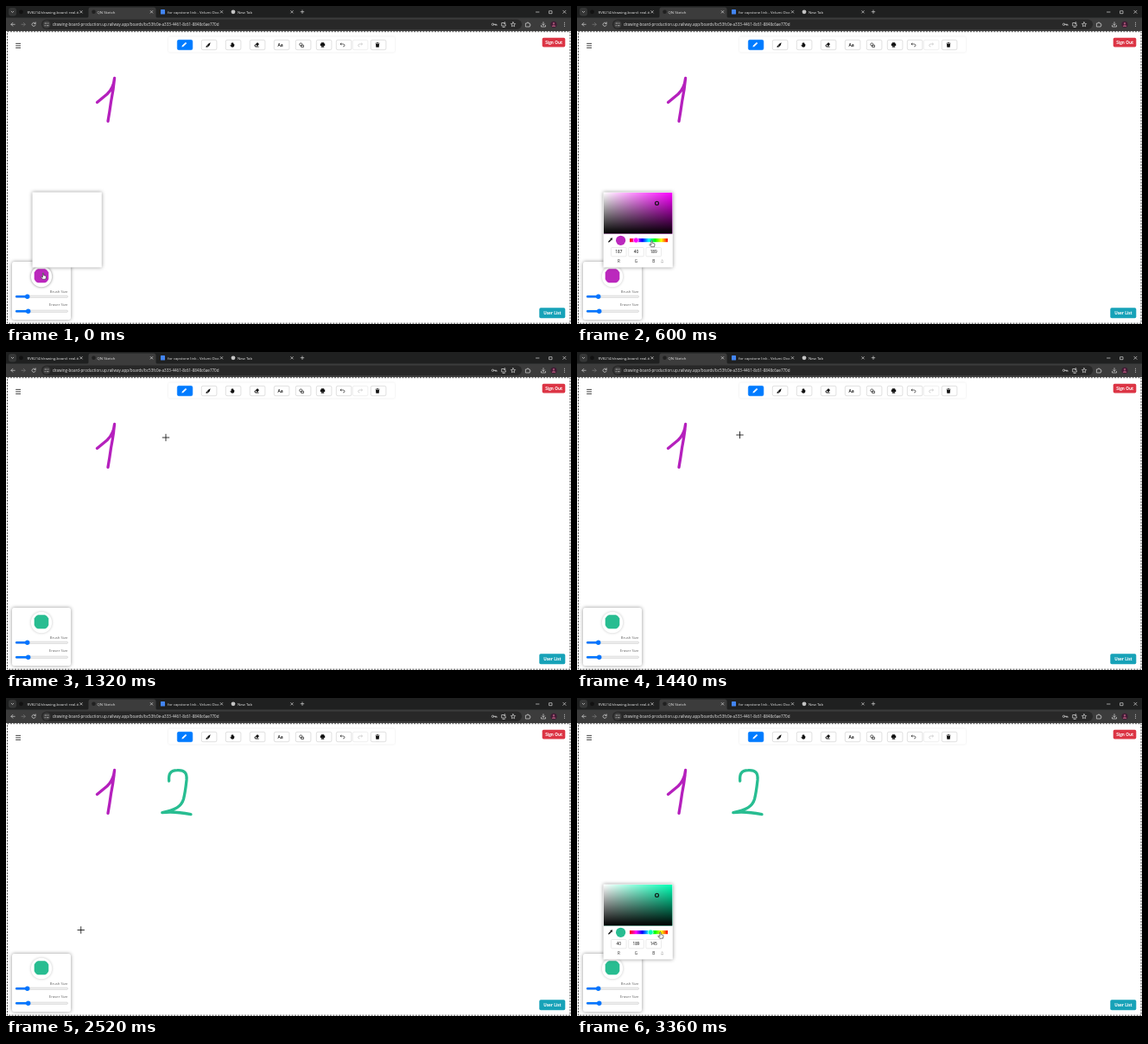
These frames come from a looping animation (654 by 368 pixels, 3480 ms). An HTML page:

```html
<!DOCTYPE html>
<html lang="en">
<head>
<meta charset="utf-8">
<title>Drawing board</title>
<style>
  html, body { margin: 0; width: 100%; height: 100%; overflow: hidden; background: #fff; }
  svg { display: block; width: 100vw; height: 100vh; }
  text { font-family: "Open Sans", "Noto Sans", sans-serif; font-size: 4.3px; }
  .light { fill: #e4e4e4; }
  .line { fill: none; stroke-linecap: round; stroke-linejoin: round; }
  .chrome { stroke: #d6d6d6; stroke-width: .7; }
  .mid { text-anchor: middle; }
  .button { font-size: 4.7px; font-weight: 700; fill: #fff; text-anchor: middle; }
  .label { font-size: 4.3px; fill: #666; text-anchor: end; }
  .shadow { filter: drop-shadow(0 .7px 2px rgba(0, 0, 0, .42)); }
</style>
</head>
<body>
<svg id="stage" viewBox="0 0 654 368" preserveAspectRatio="none">
  <defs>
    <linearGradient id="white"><stop stop-color="#fff"/><stop offset="1" stop-color="#fff" stop-opacity="0"/></linearGradient>
    <linearGradient id="black" x2="0" y2="1"><stop stop-color="#000" stop-opacity="0"/><stop offset="1"/></linearGradient>
    <linearGradient id="rainbow">
      <stop stop-color="#f00"/><stop offset=".167" stop-color="#f0f"/><stop offset=".333" stop-color="#00f"/>
      <stop offset=".5" stop-color="#0ff"/><stop offset=".667" stop-color="#0f0"/><stop offset=".833" stop-color="#ff0"/>
      <stop offset="1" stop-color="#f00"/>
    </linearGradient>
    <path id="close" class="line chrome" d="M-1.3-1.3 1.3 1.3M1.3-1.3-1.3 1.3"/>
  </defs>

  <!-- browser frame -->
  <rect width="654" height="14" fill="#1f2020"/>
  <rect y="13.5" width="654" height="15.5" fill="#3c3c3c"/>
  <path d="M93 14q2.5 0 2.5-2.5V4q0-2.5 2.5-2.5H171q2.5 0 2.5 2.5v7.5q0 2.5 2.5 2.5z" fill="#3c3c3c"/>
  <rect x="3" y="2" width="9" height="9.5" rx="3" fill="#353636"/>
  <path class="line chrome" d="M6.2 6.2 7.5 7.5 8.8 6.2M341.2 6.7h3.6M343 4.9v3.6M613.5 7h3.5M629 5.7h3v3h-3zM644.8 5.2l3.2 3.2m0-3.2-3.2 3.2"/>
  <circle cx="17.5" cy="6.8" r="2.4" fill="#111"/>
  <circle cx="101.5" cy="6.8" r="2.3" fill="#202020"/>
  <rect x="179" y="4" width="5" height="5.5" rx=".6" fill="#4285f4"/>
  <circle cx="263" cy="6.8" r="2.4" fill="#c4c4c4"/>
  <g class="light">
    <text x="24.5" y="8.5">RV8214/drawing-board: real-ti</text>
    <text x="105.5" y="8.5">QN Sketch</text>
    <text x="187" y="8.5">for capstone link - Velumi Doc</text>
    <text x="268" y="8.5">New Tab</text>
  </g>
  <use href="#close" x="87" y="6.8"/><use href="#close" x="168.5" y="6.8"/>
  <use href="#close" x="249.5" y="6.8"/><use href="#close" x="331" y="6.8"/>
  <rect x="41" y="15.5" width="556" height="11.5" rx="5.7" fill="#282828"/>
  <circle cx="47" cy="21.3" r="4.5" fill="#3c3c3c"/>
  <path class="line chrome" d="M45 20h2m1.5 0h.6M45 22.7h.5m1.7 0h2M10.2 21.3H6m1.8-1.9L6 21.3l1.8 1.9M34 20.2a2.1 2.1 0 1 0 .2 1.8M34.2 18.8v1.6h-1.6"/>
  <path class="line" stroke="#777" stroke-width=".75" d="M18 21.3h4.2m-1.8-1.9 1.8 1.9-1.8 1.9"/>
  <text class="light" x="54" y="23.1" style="font-size:4.56px">drawing-board-production.up.railway.app/boards/bc53fc0e-a333-4461-8c61-8848c6ae770d</text>
  <g class="line chrome">
    <circle cx="563.5" cy="21.3" r="1.2"/><path d="M565 21.3h3v1.2M566.7 21.3v1"/>
    <path d="M576.5 19.5H573.7v3.5h4.7v-1.3M575 24.5h2.2M577.3 18.5v2.5m-1-1 1 1 1-1"/>
    <path d="m587 18.7.8 1.7 1.8.2-1.3 1.3.3 1.8-1.6-.9-1.6.9.3-1.8-1.3-1.3 1.8-.2z"/>
    <path d="M601.8 20h1.4q0-1.3.8-1.3t.8 1.3h1.4v1.2q1 0 1 .8t-1 .8v1.2h-4.4z"/>
    <path d="M622 18.7v3.5m-1.5-1.4 1.5 1.5 1.5-1.5M619.5 22.5v1.5h5v-1.5"/>
  </g>
  <circle cx="634" cy="21.3" r="3.6" fill="#401c35"/>
  <path d="M631.8 24.1q0-2.2 2.2-2.2t2.2 2.2zM632.8 20.3a1.2 1.2 0 1 1 2.4 0 1.2 1.2 0 1 1-2.4 0" fill="#a04f70"/>
  <path class="line" stroke="#ddd" stroke-width="1" d="M646.5 19.3h.01M646.5 21.3h.01M646.5 23.3h.01"/>

  <!-- page -->
  <rect y="29" width="654" height="339" fill="#fff"/>
  <rect x="1.5" y="29.7" width="651.5" height="337.5" fill="none" stroke="#000" stroke-width=".7" stroke-dasharray="2.04 1.37"/>
  <path d="M11.2 43.4h5.8M11.2 45.9h5.8M11.2 48.4h5.8" stroke="#333" stroke-width=".9"/>
  <rect x="188" y="35.5" width="262" height="18" rx="2" fill="#fff" style="filter:drop-shadow(0 .5px 1px rgba(0,0,0,.1))"/>
  <g id="tools"></g>
  <rect x="620.7" y="36.7" width="26.6" height="10.8" rx="1.7" fill="#dc3545"/>
  <text class="button" x="634.1" y="43.8">Sign Out</text>
  <rect x="617.3" y="349.2" width="30" height="12" rx="1.7" fill="#17a2b8"/>
  <text class="button" x="632.4" y="356.9">User List</text>
  <g class="line" stroke-width="3.3">
    <path d="M105.5 111.5 117 102Q124.500 95 125.600 83.300 124.500 96 121.500 111 120 122 118 133.400" stroke="rgb(181,32,189)"/>
    <path id="two" d="M188.700 96C188 88 190 84 198 83.700 207 83 209.700 87 209 95 208 104 207.500 109 205.500 117 203 125.500 196 129.500 180.800 132.600 191 131.200 203 132.500 214 134.600" stroke="rgb(40,189,145)"/>
  </g>

  <!-- brush panel -->
  <rect class="shadow" x="7" y="296" width="68" height="67" rx="2.5" fill="#fff"/>
  <circle id="ring" cx="41" cy="313" r="12.2" fill="#fff"/>
  <path id="swatch" d="M37 304.300h8q2 .6 3.200 2.400l1.100 1.800v7.600l-1.100 1.800q-1.200 1.800-3.200 2.400h-8q-2-.6-3.200-2.400l-1.100-1.800v-7.600l1.100-1.800q1.200-1.800 3.200-2.400z"/>
  <text class="label" x="71.5" y="331.6">Brush Size</text>
  <text class="label" x="71.5" y="347">Eraser Size</text>
  <g id="sliders"></g>

  <!-- colour popup -->
  <g id="popup">
    <rect class="shadow" x="30.5" y="215.5" width="80.3" height="87" fill="#fff"/>
    <g id="picker">
      <rect id="field" x="31" y="216" width="79.3" height="47.5"/>
      <rect x="31" y="216" width="79.3" height="47.5" fill="url(#white)"/>
      <rect x="31" y="216" width="79.3" height="47.5" fill="url(#black)"/>
      <circle id="fieldMark" cx="92.5" cy="228.3" r="2"/>
      <path d="m36 273.600.4-1.400 2.300-2.300 1.100 1.100-2.300 2.300zM38.300 269.200l2 2 .6-.7-.5-.5.7-.8q.2-.9-.7-1-.4 0-1.100.8l-.5-.5z" fill="#111"/>
      <circle id="chip" cx="50.6" cy="271.3" r="5.6"/>
      <rect x="61" y="269" width="44" height="4.2" fill="url(#rainbow)"/>
      <circle id="hueMark" cy="271.1" r="3"/>
      <g id="channels"></g>
      <path class="line" stroke="#555" stroke-width=".5" d="m97.800 294.800.8-.8.8.8m-1.600 1.600.8.8.8-.8"/>
    </g>
  </g>

  <g id="cursor">
    <path id="arrow" d="M0 0v6.2l1.5-1.3 1 2.2 1-.4-1-2.2h2z" fill="#fff" stroke="#222" stroke-width=".6"/>
    <path id="hand" d="M-.6-3q.6-.8 1.200 0v2.700l2.100.5q1 .3.800 1.300L3 4.200H-.7L-2.700 1.600q.3-.9 1.200-.2l.9.700z" fill="#fff" stroke="#222" stroke-width=".6"/>
    <path id="cross" d="M-4.200 0h8.400M0-4.200v8.400" stroke="#111" stroke-width=".85" fill="none"/>
  </g>
</svg>
<script>
const LOOP = 3480, STEP = 120;
const $ = id => document.getElementById(id);
const set = (id, attrs) => { for (const k in attrs) $(id).setAttribute(k, attrs[k]); };
const show = (id, on) => { $(id).style.display = on ? '' : 'none'; };

// left edge of the button, centre of the icon, icon shape, drawn as outline
const tools = [
  [198, 206, 'M-2.6 2.6-2.1.8 1-2.3 2.3-1-.8 2.1zM1.4-2.7q.5-.5 1 0l.4.4q.5.5 0 1l-.3.3L1.1-2.4z'],
  [226, 234, 'M2.6-2.7Q.3-1.8-1.2.2L.5 1.900Q2.600-.5 2.600-2.700M-1.500.6q-1 .4-1.100 2.100 2.200.2 2.700-.7z'],
  [254, 262, 'M-2.6.3q.6-.8 1.2.3V-2q.5-.7.9 0v1.5-2.1q.5-.7.9 0v2.1-1.7q.5-.6.9 0V-.2l.1-.8q.6-.5.9.2V1Q2 2.7.3 2.8q-1.6 0-2.2-1.3z'],
  [282, 290, 'M-2.7.8.6-2.5q.5-.4.9 0L2.7-1.3q.4.4 0 .8L.7 1.7h2v.8h-4zm1.1 0L-.7 1.7h.5l.8-.8L-.6-.3z'],
  [310, 317.5, ''],
  [335, 342, 'M-2.3-.5a1.6 1.6 0 1 1 3.2 0 1.6 1.6 0 1 1-3.2 0M-.3.3h2.800v2.200H-.3z', true],
  [359, 366.5, 'M-1.7-2.7h3.4v1.2h1V1H-2.7v-2.5h1zM-1.7 1.3h3.4v1.4h-3.4z'],
  [382, 389.5, 'M-1.2-2.2-2.5-1l1.3 1.2M-2.5-1H.7q1.7.2 1.7 1.5T.7 2', true],
  [401, 410, 'M1.2-2.2 2.5-1 1.2.2M2.5-1H-.7Q-2.4-.8-2.4.5T-.7 2', true],
  [422, 430, 'M-2.4-2.2H-1l.3-.6H.7l.3.600h1.400v.8h-4.800zM-2-.9h4l-.3 3.700h-3.400z'],
];
$('tools').innerHTML = tools.map(([x, cx, d, outline], i) => {
  const ink = i === 0 ? '#fff' : i === 8 ? '#bbb' : '#111';
  const paint = outline ? `fill="none" stroke="${ink}" stroke-width=".65"` : `fill="${ink}"`;
  const icon = d ? `<path transform="translate(${cx} 45)" d="${d}" ${paint}/>`
    : `<text class="mid" x="${cx}" y="46.8" style="font-size:5px;font-weight:600">Aa</text>`;
  return `<rect x="${x + .3}" y="39.3" width="17.6" height="11.4" rx="1.7"
    fill="${i ? '#fff' : '#007bff'}" stroke="${i ? i === 8 ? '#e4e4e4' : '#ccc' : '#007bff'}" stroke-width=".6"/>` + icon;
}).join('');

$('sliders').innerHTML = [[336.3, 24.7], [353.2, 25.7]].map(([y, x]) =>
  `<rect x="11" y="${y - 1.2}" width="60.5" height="2.4" rx="1.2" fill="#efefef" stroke="#bbb" stroke-width=".4"/>
   <rect x="11" y="${y - 1.2}" width="${x - 11}" height="2.4" rx="1.2" fill="#0075ff"/>
   <circle cx="${x}" cy="${y}" r="2.7" fill="#0075ff"/>`).join('');

$('channels').innerHTML = ['R', 'G', 'B'].map((name, i) => {
  const x = 48.3 + i * 20.2;
  return `<rect x="${x - 8.8}" y="279.5" width="17.6" height="10.3" rx="1" fill="#fff" stroke="#ddd" stroke-width=".6"/>
    <text class="mid" id="value${i}" x="${x}" y="286.2" style="font-size:4.7px"/>
    <text class="mid" x="${x}" y="297.2" style="font-size:4.5px" fill="#222">${name}</text>`;
}).join('');

const purple = { rgb: [187, 40, 189], pure: '#fb00ff', hueX: 68.3 };
const green = { rgb: [40, 189, 145], pure: '#00ffb4', hueX: 85.2 };

// time, x, y, pointer shape used from then on
const moves = [
  [0, 43, 312, 'hand'], [120, 44, 310, 'arrow'], [240, 52, 302, 'arrow'], [480, 82, 277, 'hand'],
  [600, 86.5, 274.5, 'hand'], [720, 85.5, 272.5, 'hand'], [840, 92, 256, 'arrow'], [960, 104.5, 223, 'arrow'],
  [1080, 133, 175, 'cross'], [1320, 185, 99, 'cross'], [1440, 188.5, 96, 'cross'],
  [2040, 213.5, 134.5, 'cross'], [2160, 206, 150, 'cross'], [2640, 47, 308, 'hand'],
  [2760, 43, 312, 'hand'], [2880, 56, 298.5, 'arrow'], [3000, 68, 289, 'arrow'],
  [3240, 93, 275, 'hand'], [3360, 96.5, 274, 'hand'], [LOOP, 96.5, 274, 'hand'],
];
const two = $('two'), twoLength = two.getTotalLength();

function pointer(t, drawn) {
  const i = moves.findIndex((m, n) => t >= m[0] && t < moves[n + 1][0]);
  const [t0, x0, y0, shape] = moves[i], [t1, x1, y1] = moves[i + 1];
  if (drawn > 0 && drawn < 1) {
    const p = two.getPointAtLength(drawn * twoLength);
    return [p.x, p.y, shape];
  }
  const k = (t - t0) / (t1 - t0);
  return [x0 + (x1 - x0) * k, y0 + (y1 - y0) * k, shape];
}

function render(t) {
  const colour = t < 720 ? purple : green;
  const rgb = `rgb(${colour.rgb})`;
  const loading = t < 120 || (t >= 2760 && t < 3000);
  const open = t < 1200 || t >= 2760;
  const hueActive = t >= 720 && t < 1200;
  const drawn = Math.min(1, Math.max(0, (t - 1440) / 600));

  show('two', drawn > 0);
  two.style.strokeDasharray = `${drawn * twoLength} ${twoLength + 9}`;

  set('swatch', { fill: rgb });
  $('ring').style.filter = `drop-shadow(0 .5px 1.5px rgba(0,0,0,${loading ? .5 : .23}))`;
  show('popup', open);
  show('picker', open && !loading);
  set('field', { fill: colour.pure });
  set('chip', { fill: rgb });
  set('fieldMark', { fill: rgb, stroke: hueActive ? '#fff' : '#111', 'stroke-width': hueActive ? .8 : 1.1 });
  set('hueMark', {
    cx: colour.hueX, fill: colour.pure,
    stroke: hueActive ? '#111' : '#fff', 'stroke-width': hueActive ? 1 : .6,
  });
  colour.rgb.forEach((v, i) => { $('value' + i).textContent = v; });

  const [x, y, shape] = pointer(t, drawn);
  set('cursor', { transform: `translate(${x} ${y})` });
  ['arrow', 'hand', 'cross'].forEach(id => show(id, id === shape));
}

const start = performance.now();
function tick() {
  const t = (performance.now() - start + 4) % LOOP;
  render(Math.floor(t / STEP) * STEP);
  requestAnimationFrame(tick);
}
tick();
</script>
</body>
</html>
```
